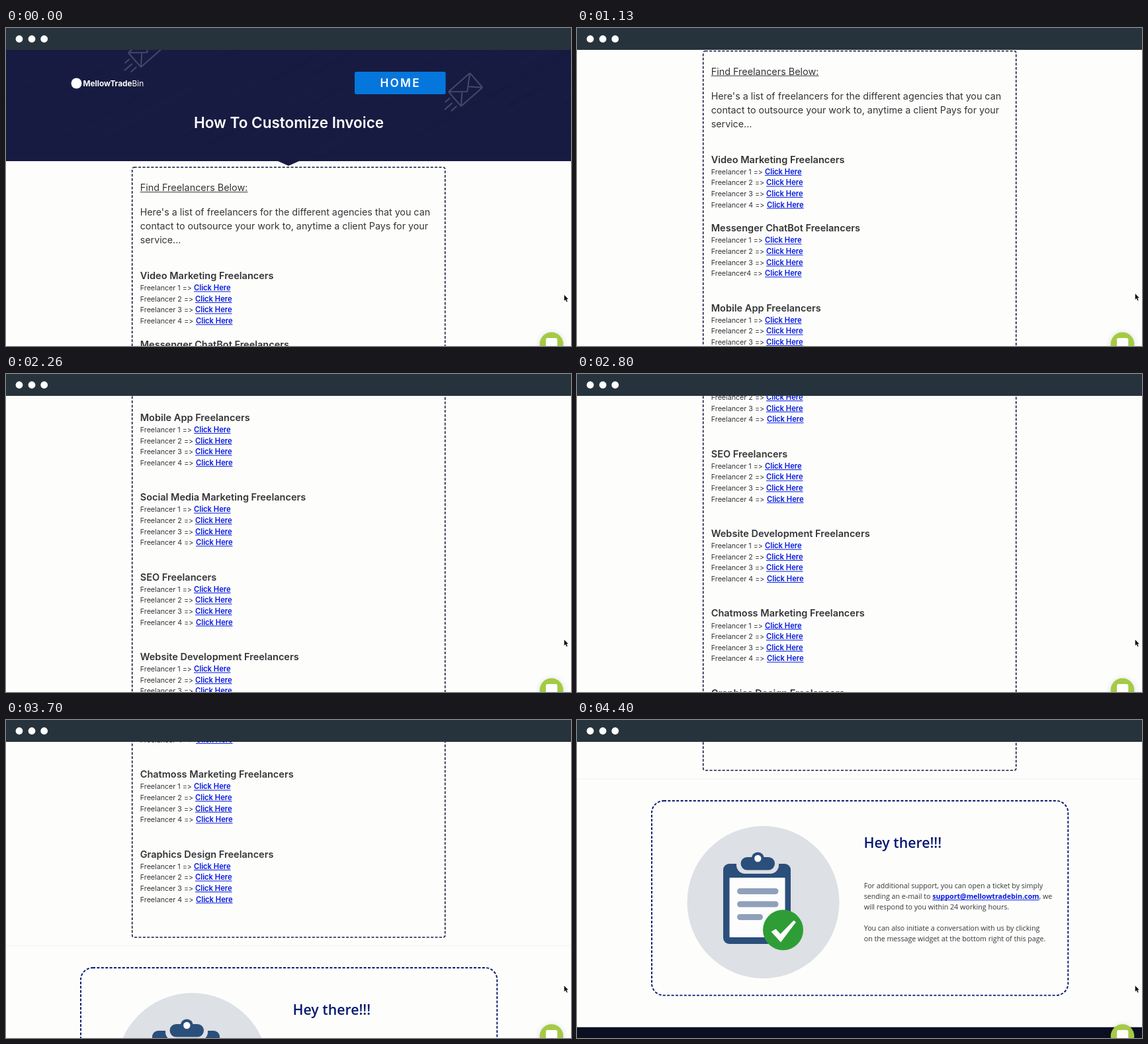
An HTML page with a canvas for the animation above (4430 ms loop, 854 by 480 pixels).

```html
<!DOCTYPE html>
<html lang="en">
<head>
<meta charset="utf-8">
<title>How To Customize Invoice</title>
<style>
html, body { margin: 0; width: 100%; height: 100%; overflow: hidden; background: #fdfefc; }
canvas { display: block; }
</style>
</head>
<body>
<canvas id="stage" width="854" height="480"></canvas>
<script>
const ctx = document.getElementById('stage').getContext('2d');
const LOOP = 4430, W = 854, H = 480;
const SANS = 'Inter, "Open Sans", sans-serif';
const OPEN = '"Open Sans", "Noto Sans", sans-serif';
const PAGE = '#fdfefc', INK = '#333436', NAVY = '#181b41', LINK = '#0519e3', CARD = '#06196f';

// [time, scroll offset]: four wheel gestures with short rests
const KEYS = [
  [467, 0], [650, 28], [850, 110], [1000, 160], [1133, 175.5], [1233, 175.5],
  [1500, 215], [1800, 306], [2266, 532], [2566, 640], [2600, 640], [2800, 718.3],
  [3130, 885], [3440, 965], [3700, 997.5], [4050, 1150], [4400, 1249.5]
];
const slopes = KEYS.slice(1).map((k, i) => (k[1] - KEYS[i][1]) / (k[0] - KEYS[i][0]));
const tangents = KEYS.map((_, i) => {
  const a = slopes[i - 1], b = slopes[i];
  return a > 0 && b > 0 ? 2 * a * b / (a + b) : 0;
});

function scrollAt(t) {
  const last = KEYS.length - 1;
  if (t <= KEYS[0][0]) return 0;
  if (t >= KEYS[last][0]) return KEYS[last][1];
  let i = 0;
  while (t > KEYS[i + 1][0]) i++;
  const [t0, y0] = KEYS[i], [t1, y1] = KEYS[i + 1];
  const d = t1 - t0, u = (t - t0) / d, v = 1 - u;
  return y0 * (1 + 2 * u) * v * v + y1 * u * u * (3 - 2 * u)
    + d * u * v * (tangents[i] * v - tangents[i + 1] * u);
}

function text(str, x, y, size, weight = 400, color = INK, family = SANS) {
  ctx.font = `${weight} ${size}px ${family}`;
  ctx.fillStyle = color;
  ctx.fillText(str, x, y);
  return ctx.measureText(str).width;
}

function underlined(str, x, y, size, weight, color, family) {
  const w = text(str, x, y, size, weight, color, family);
  ctx.fillRect(x, y + 1.2, w, 1);
  return w;
}

function disc(x, y, r, color) {
  ctx.fillStyle = color;
  ctx.beginPath();
  ctx.arc(x, y, r, 0, Math.PI * 2);
  ctx.fill();
}

function box(x, y, w, h, r, color) {
  ctx.fillStyle = color;
  ctx.beginPath();
  ctx.roundRect(x, y, w, h, r);
  ctx.fill();
}

function shape(points, color) {
  ctx.fillStyle = color;
  ctx.beginPath();
  points.forEach(p => ctx.lineTo(p[0], p[1]));
  ctx.closePath();
  ctx.fill();
}

function dashed(x, y, w, h, r, width, color) {
  ctx.save();
  ctx.setLineDash([4, 2.4]);
  ctx.lineWidth = width;
  ctx.strokeStyle = color;
  ctx.beginPath();
  ctx.roundRect(x, y, w, h, r);
  ctx.stroke();
  ctx.restore();
}

function envelope(x, y) {
  ctx.save();
  ctx.translate(x, y);
  ctx.rotate(-0.72);
  ctx.strokeStyle = '#444869';
  ctx.lineWidth = 2;
  ctx.lineJoin = ctx.lineCap = 'round';
  ctx.beginPath();
  ctx.roundRect(-21.5, -14.5, 43, 29, 2);
  ctx.moveTo(-21, -14);
  ctx.lineTo(0, 4);
  ctx.lineTo(21, -14);
  ctx.moveTo(-21, 14);
  ctx.lineTo(-7, 0);
  ctx.moveTo(21, 14);
  ctx.lineTo(7, 0);
  [[-35, -27, -6], [-43, -29, 2], [-37, -27, 10]].forEach(([a, b, h]) => {
    ctx.moveTo(a, h);
    ctx.lineTo(b, h);
  });
  ctx.stroke();
  ctx.restore();
}

function brushwork() {
  let seed = 11;
  const rnd = () => (seed = seed * 16807 % 2147483647) / 2147483647;
  ctx.save();
  ctx.beginPath();
  ctx.rect(0, 33, W, 168);
  ctx.clip();
  for (let i = 0; i < 36; i++) {
    const x = rnd() * W, y = 30 + rnd() * 170, len = 40 + rnd() * 110;
    ctx.strokeStyle = i % 2 ? 'rgba(38,50,100,.07)' : 'rgba(12,14,45,.08)';
    ctx.lineWidth = 2 + rnd() * 6;
    ctx.beginPath();
    ctx.moveTo(x, y);
    ctx.lineTo(x + len, y - len * 0.55);
    ctx.stroke();
  }
  ctx.restore();
}

function header() {
  ctx.fillStyle = NAVY;
  ctx.fillRect(0, 0, W, 201);
  brushwork();
  shape([[410, 200.5], [444, 200.5], [427, 208]], NAVY);
  envelope(210.5, 34);
  envelope(694.5, 93);
  disc(106.5, 83.5, 8, '#fff');
  const w = text('MellowTrade', 116.5, 87.8, 11.8, 700, '#fff');
  text('Bin', 116.5 + w, 87.8, 11.8, 400, '#fff');
  box(527, 66, 137.5, 34, 2.5, '#0577dc');
  ctx.letterSpacing = '2.3px';
  text('HOME', 565.5, 89.2, 17.2, 600, '#fff');
  ctx.letterSpacing = '0px';
  ctx.textAlign = 'center';
  text('How To Customize Invoice', 427.5, 151, 22.5, 600, '#fff');
  ctx.textAlign = 'left';
}

const SECTIONS = [
  ['Video Marketing', 374], ['Messenger ChatBot', 477.7], ['Mobile App', 598],
  ['Social Media Marketing', 718.4], ['SEO', 838.9], ['Website Development', 959.2],
  ['Chatmoss Marketing', 1079.6], ['Graphics Design', 1200]
];

function list() {
  dashed(190.7, 210.3, 473, 1115.2, 3, 1.6, '#151a45');
  underlined('Find Freelancers Below:', 202.7, 246, 14.4);
  ["Here's a list of freelancers for the different agencies that you can",
   'contact to outsource your work to, anytime a client Pays for your',
   'service...'
  ].forEach((line, i) => text(line, 202.7, 283.4 + i * 20.8, 14.27));

  SECTIONS.forEach(([name, mid], s) => {
    text(name + ' Freelancers', 202.7, mid + 5, 14.53, 600);
    for (let n = 1; n <= 4; n++) {
      const y = mid + 5.6 + n * 16.6;
      const tight = s === 1 && n === 4;
      // the two signs are drawn apart so that the font does not join them into an arrow
      const w = text(`Freelancer${tight ? '' : ' '}${n} =`, 202.8, y, 10.7);
      text('>', 202.8 + w, y, 10.7);
      const x = tight ? 284 : [284, 286, 286, 287][n - 1];
      underlined('Click Here', x, y, 11.2, 600, LINK);
    }
  });
}

function clipboard() {
  const blue = '#2b4f7b', grey = '#dde0e4';
  disc(281.5, 275, 115, grey);
  box(221, 217, 102, 121, 9, blue);
  box(230.5, 238, 84, 90, 1, '#fdfdfd');
  box(241, 203, 64, 29, 13, grey);
  box(247.5, 207, 51.5, 19.5, 9.7, blue);
  disc(273.3, 209, 9.6, blue);
  disc(273.3, 209, 5.2, '#fff');
  [[62.5, 254], [62.5, 273.5], [39, 293]].forEach(([w, y]) => box(242, y, w, 9, 4.5, '#8fa0bb'));
  disc(311.5, 317, 30.5, '#2f9d36');
  shape([[293.5, 319.5], [300.5, 315.5], [307.5, 323], [327.5, 302.5], [331, 305], [308, 335.5]], '#fff');
}

function support() {
  ctx.fillStyle = '#f0f1ef';
  ctx.fillRect(0, 1337.8, W, 1);
  dashed(113, 1371.5, 629.3, 293.6, 18, 1.9, CARD);
  ctx.save();
  ctx.translate(0, 1249.5);
  clipboard();
  text('Hey there!!!', 433.5, 192.6, 21.3, 600, CARD, OPEN);
  const line = (str, x, y) => text(str, x, y, 10.65, 400, INK, OPEN);
  line('For additional support, you can open a ticket by simply', 433.7, 254);
  line('sending an e-mail to', 433.7, 270);
  const w = underlined('support@mellowtradebin.com', 537.3, 270, 10.65, 700, LINK, OPEN);
  line(', we', 537.3 + w, 270);
  line('will respond to you within 24 working hours.', 433.7, 286);
  line('You can also initiate a conversation with us by clicking', 433.7, 318);
  line('on the message widget at the bottom right of this page.', 433.7, 334);
  ctx.restore();
  ctx.fillStyle = '#0a1021';
  ctx.fillRect(0, 1713.2, W, 200);
}

function widget() {
  ctx.save();
  ctx.shadowColor = 'rgba(0,0,0,.16)';
  ctx.shadowBlur = 9;
  ctx.shadowOffsetY = 1;
  disc(824.5, 477, 17.8, '#a4ca45');
  ctx.restore();
  box(816, 468, 17.3, 18, 2.5, '#fff');
}

function cursor(x, y) {
  ctx.save();
  ctx.translate(x, y);
  ctx.beginPath();
  [[0, 0], [0, 9], [2, 7.2], [3.6, 10.6], [5, 10], [3.5, 6.7], [6.2, 6.5]]
    .forEach(p => ctx.lineTo(p[0], p[1]));
  ctx.closePath();
  ctx.strokeStyle = '#fff';
  ctx.lineWidth = 1.2;
  ctx.stroke();
  ctx.fillStyle = '#111';
  ctx.fill();
  ctx.restore();
}

function chrome() {
  ctx.fillStyle = '#27333c';
  ctx.fillRect(0, 0, W, 33);
  [20, 39, 57.7].forEach(x => disc(x, 16.5, 5.4, '#fff'));
}

function draw(ms) {
  const t = Math.floor((ms + 7) * 0.03) / 0.03; // the picture steps at 30 fps
  const y = scrollAt(t);
  ctx.fillStyle = PAGE;
  ctx.fillRect(0, 0, W, H);
  ctx.save();
  ctx.translate(0, -y);
  if (y < 180) header();
  list();
  if (y > 840) support();
  ctx.restore();
  widget();
  cursor(843.7, t < 230 ? 402.8 : 400.9);
  chrome();
}

const start = performance.now();
function frame(now) {
  draw(Math.max(0, now - start) % LOOP);
  requestAnimationFrame(frame);
}
draw(0);
requestAnimationFrame(frame);
</script>
</body>
</html>
```
